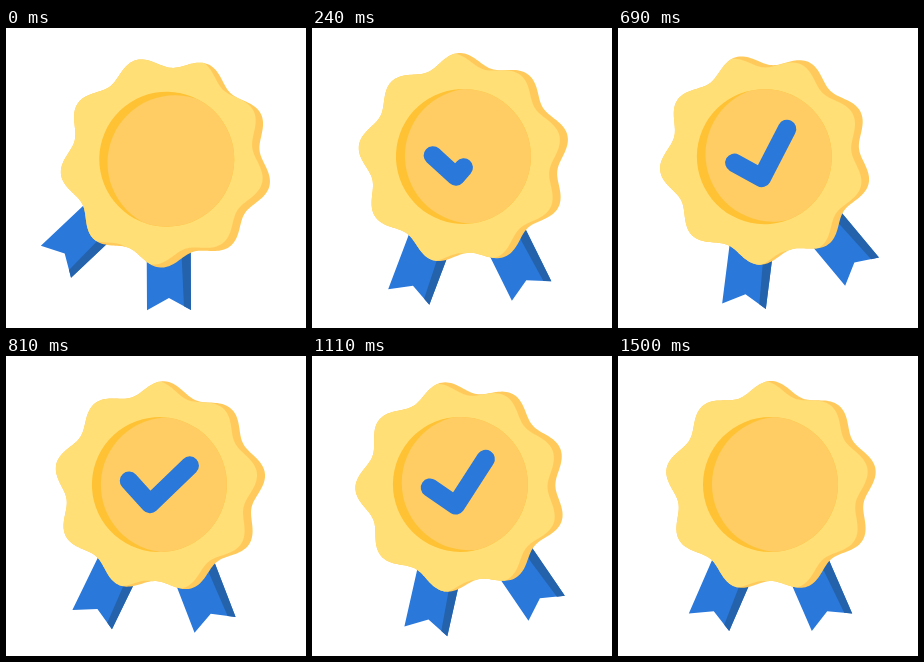
Write an HTML page that moves like this. It is 300 px wide and 300 px high and loops after 1.68 s.

```html
<!DOCTYPE html>
<html lang="en">
<head>
<meta charset="utf-8">
<title>Award badge</title>
<style>
  html, body { margin: 0; width: 100%; height: 100%; overflow: hidden; background: #fff; }
  svg { display: block; width: 100vw; height: 100vh; }
</style>
</head>
<body>
<svg viewBox="0 0 300 300">
  <defs>
    <path id="seal"/>
    <circle id="disc" cx="152.5" cy="128.5" r="67.5"/>
    <clipPath id="sealClip"><use href="#seal"/></clipPath>
    <clipPath id="discClip"><use href="#disc"/></clipPath>
    <g id="ribbon">
      <path fill="#2a78da" d="M-22 0 0-12 22 0V-100H-22Z"/>
      <path fill="#2462ab" d="M15-3.8 22 0V-100H11Z"/>
    </g>
  </defs>
  <g id="badge">
    <use href="#ribbon" transform="translate(91 266.3) rotate(23.5)"/>
    <use href="#ribbon" transform="translate(214 266.3) rotate(-23.5)"/>
    <use href="#seal" fill="#ffca5b"/>
    <g clip-path="url(#sealClip)"><use href="#seal" x="-8" fill="#ffdf76"/></g>
    <use href="#disc" fill="#ffc235"/>
    <g clip-path="url(#discClip)"><use href="#disc" x="9" fill="#ffcd64"/></g>
    <path id="check" d="M122 126 144 148.2 182 108.2" pathLength="100" fill="none"
      stroke="#2a78da" stroke-width="18.5" stroke-linecap="round" stroke-linejoin="round"/>
  </g>
</svg>
<script>
const LOOP = 1680, STEP = 30, LAST = 1500;
const $ = id => document.getElementById(id);

// Scalloped edge with nine lobes
const points = Array.from({ length: 360 }, (_, i) => {
  const a = i * Math.PI / 180, r = 100 + 6 * Math.cos(9 * a);
  return `${(153 + r * Math.sin(a)).toFixed(2)} ${(131 - r * Math.cos(a)).toFixed(2)}`;
});
$('seal').setAttribute('d', `M${points.join('L')}Z`);

// [time in ms, value], eased between neighbours
const swing = [[0, 23.2], [445, -23.1], [595, -23.2], [910, 10], [1160, -13], [1500, 0]];
const drawn = [[90, 0], [390, 100], [1200, 100], [1490, 0]];

function valueAt(keys, t) {
  const next = keys.findIndex(([time]) => time > t);
  if (next < 0) return keys[keys.length - 1][1];
  if (next === 0) return keys[0][1];
  const [t0, v0] = keys[next - 1], [t1, v1] = keys[next];
  return v0 + (v1 - v0) * (1 - Math.cos(Math.PI * (t - t0) / (t1 - t0))) / 2;
}

function render(now) {
  const t = Math.min(LAST, Math.floor((now % LOOP) / STEP) * STEP);
  const length = valueAt(drawn, t);
  $('badge').setAttribute('transform', `rotate(${valueAt(swing, t)} 150 150)`);
  $('check').setAttribute('stroke-dasharray', `${length} 200`);
  $('check').setAttribute('visibility', length > 0 ? 'visible' : 'hidden');
}

const start = performance.now();
function tick() {
  render(performance.now() - start);
  requestAnimationFrame(tick);
}
tick();
</script>
</body>
</html>
```
